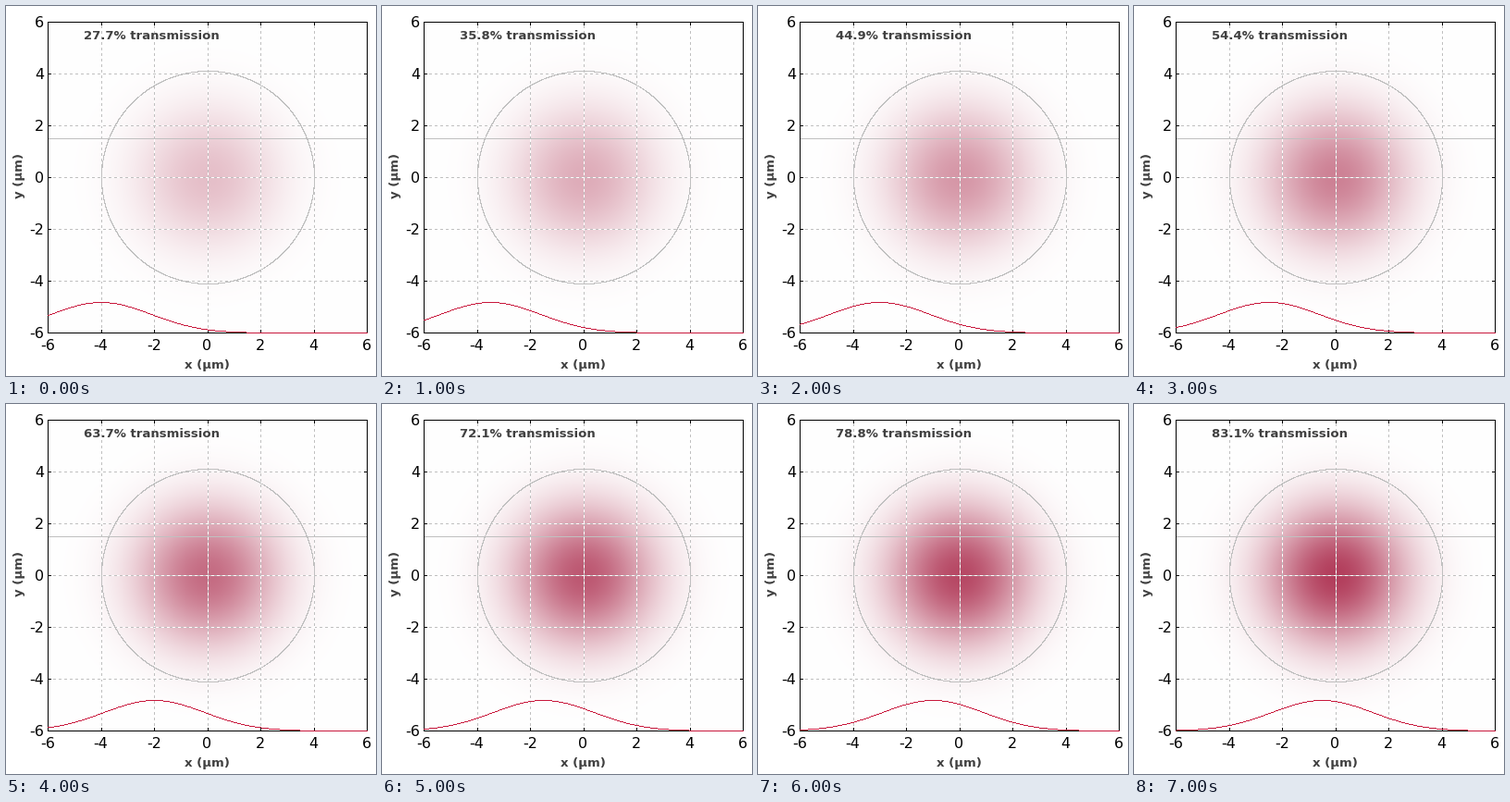
Write a matplotlib script that moves like this. It is 400 px wide and 400 px high and loops after 8 s.

```python
import numpy as np
import matplotlib.pyplot as plt
from matplotlib.animation import FuncAnimation

DPI = 100
PX = 72 / DPI                      # one pixel in points
SIZE = 400
LEFT, RIGHT, TOP, BOTTOM = 45, 390, 17, 353
SX, SY = (RIGHT - LEFT) / 12, (BOTTOM - TOP) / 12
SPREAD = 0.14                      # intensity falls as exp(-SPREAD * r^2)
PEAK = 33                          # beam profile height in pixels
ABSORB = np.array([92, 232, 196]) / 255
GRAY, BLACK, RED = 192 / 255, 0, np.array([200, 24, 60]) / 255
TEXT = "#404040"
TRANSMISSION = [27.7, 35.8, 44.9, 54.4, 63.7, 72.1, 78.8, 83.1]


def px(x):
    return LEFT + (x + 6) * SX


def py(y):
    return BOTTOM - (y + 6) * SY


def whole(v):
    """Nearest pixel, halves upward."""
    return np.floor(np.asarray(v) + 0.5).astype(int)


fig = plt.figure(figsize=(SIZE / DPI, SIZE / DPI), dpi=DPI, facecolor="white")
ax = fig.add_axes([0, 0, 1, 1])
ax.axis("off")
stage = ax.imshow(np.ones((SIZE, SIZE, 3)), extent=(0, SIZE, SIZE, 0),
                  interpolation="nearest", aspect="auto")


def label(x, y, s, size, color="black", **kw):
    return ax.text(x, y, s, fontsize=size * PX, color=color,
                   family="DejaVu Sans", va="baseline", **kw)


for v in range(-6, 7, 2):
    label(px(v) - 0.2, 372, str(v), 16, ha="center")
    label(41.5, py(v) + 6, str(v), 16, ha="right")
label(217, 392, "x (µm)", 13.25, TEXT, weight="bold", ha="center")
label(21, 183.8, "y (µm)", 13.25, TEXT, weight="bold", ha="right",
      rotation=90).set_va("center")
caption = label(84, 36.4, "", 13.25, TEXT, weight="bold")

# Mode intensity on the pixel grid inside the axes
cols = np.arange(LEFT, RIGHT + 1)
rows = np.arange(TOP, BOTTOM + 1)
r2 = (((cols - px(0)) / SX) ** 2)[None, :] + (((rows - py(0)) / SY) ** 2)[:, None]
mode = np.exp(-SPREAD * r2 - 0.001 * r2 ** 2)

ticks = np.arange(-4, 5, 2)
grid_x, grid_y = whole(px(ticks)), whole(py(ticks))
dots_x = np.where((cols - LEFT) % 6 < 3, GRAY, 1.0)
dots_y = np.where((BOTTOM - rows) % 6 < 3, GRAY, 1.0)

turn = np.linspace(0, 2 * np.pi, 3000)
ring_x = whole(218 + 115 * np.cos(turn))
ring_y = whole(185 + 115 * np.sin(turn))


def paint_axes(img):
    """Dotted grid with white gaps, core outline, section line, frame."""
    for x, y in zip(grid_x, grid_y):
        img[TOP:BOTTOM + 1, x] = dots_y[:, None]
        img[y, LEFT:RIGHT + 1] = dots_x[:, None]
    img[ring_y, ring_x] = GRAY
    img[143, LEFT:RIGHT + 1] = GRAY
    for x, y in zip(grid_x, grid_y):
        img[TOP:TOP + 4, x] = img[BOTTOM - 3:BOTTOM + 1, x] = BLACK
        img[y, LEFT:LEFT + 4] = img[y, RIGHT - 3:RIGHT + 1] = BLACK
    img[[TOP, BOTTOM], LEFT:RIGHT + 1] = BLACK
    img[TOP:BOTTOM + 1, [LEFT, RIGHT]] = BLACK


def draw(i):
    share = TRANSMISSION[i]
    centre = px(-4 + 0.5 * i)
    img = np.ones((SIZE, SIZE, 3))
    img[TOP:BOTTOM + 1, LEFT:RIGHT + 1] -= share / 100 * mode[..., None] * ABSORB
    paint_axes(img)
    beam = BOTTOM - PEAK * np.exp(-SPREAD * ((cols - centre) / SX) ** 2)
    img[whole(beam), cols] = RED
    stage.set_data(img)
    caption.set_text(f"{share:.1f}% transmission")
    return stage, caption


anim = FuncAnimation(fig, draw, frames=8, interval=1000, repeat=True,
                     repeat_delay=0, blit=False)
plt.show()
```
